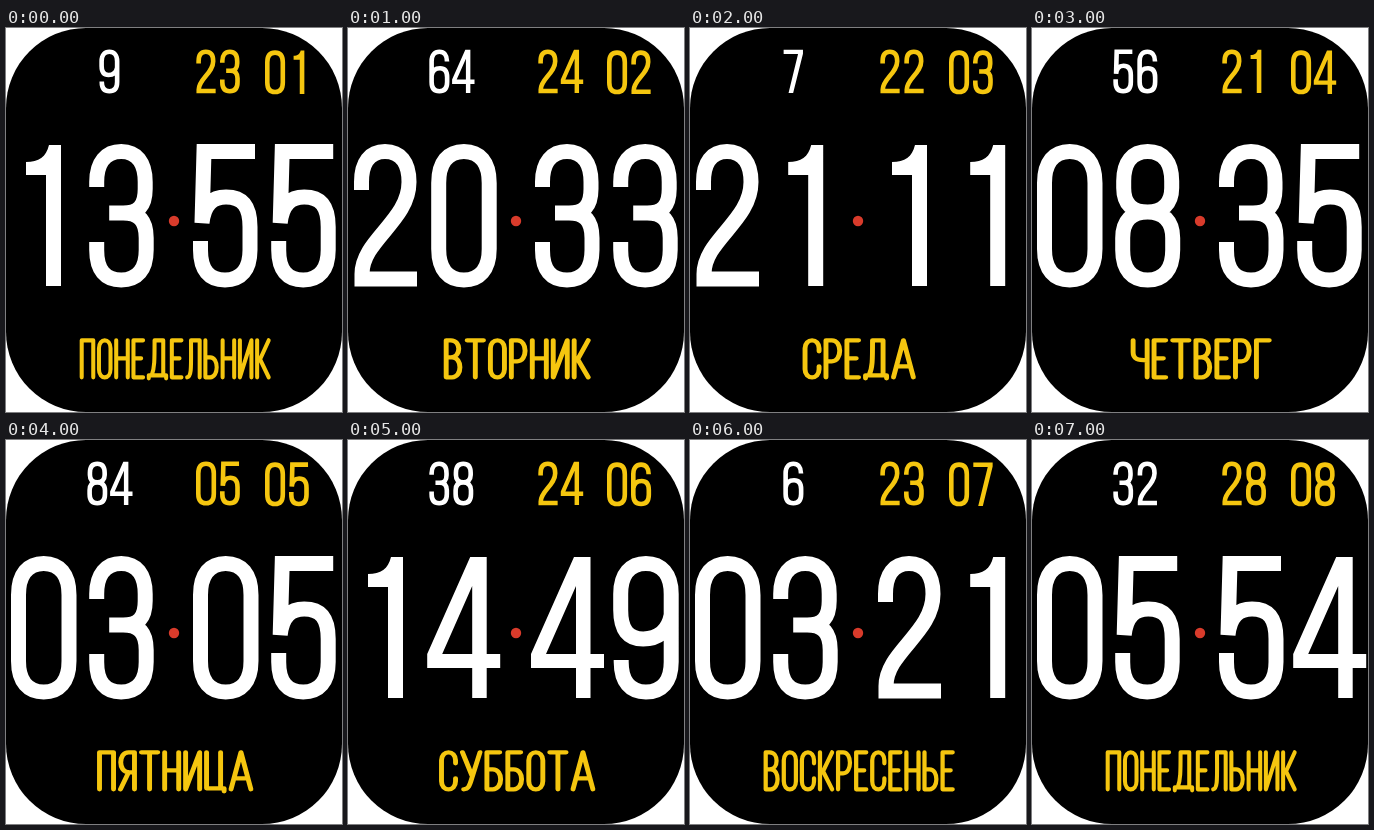
Animation, 336 px wide and 384 px high, one loop 8 s. Source, as an HTML page:

```html
<!DOCTYPE html>
<html lang="ru">
<head>
<meta charset="utf-8">
<title>Циферблат</title>
<style>
  html, body { margin: 0; width: 100%; height: 100%; overflow: hidden; background: #fff; }
  svg { display: block; width: 336px; height: 384px; }
  .line { fill: none; stroke: currentColor; stroke-width: 15; }
  .solid { fill: currentColor; fill-rule: evenodd; }
  .letter { fill: none; stroke: #f5c60f; stroke-width: 4.2; stroke-linecap: round; stroke-linejoin: round; }
</style>
</head>
<body>
<svg viewBox="0 0 336 384">
  <rect width="336" height="384" rx="80"/>
  <circle cx="168" cy="193" r="5.2" fill="#d83b2b"/>
  <g id="face"></g>
</svg>
<script>
// Digits live in a cell 65 wide and 143.5 high
const LINES = {
  0: 'M7.5 39C7.5 18 17 7.5 32.7 7.5S58 18 58 39V105C58 126 48 136 32.7 136S7.5 126 7.5 105Z',
  2: 'M8.5 46V38C8.5 18 17 7.5 32 7.5S56 18 56 38C56 77 9 96 9 130V135H64',
  3: 'M7.5 43V38C7.5 18 17 7.5 32 7.5S56 18 56 38V45C56 62 49 69 34 69H20M34 69C49 69 57 76 57 94V106C57 126 48 136 32 136S7.5 126 7.5 106V98',
  5: 'M62 7.5H11L9 79C11 60 20 53 33 53C50 53 57 63 57 83V106C57 126 48 136 32 136S7.5 126 7.5 106V97',
  6: 'M57.5 39V38C57.5 18 48 7.5 32.7 7.5S7.5 18 7.5 38V106C7.5 126 17 136 32.7 136S58 126 58 106V90C58 70 50 61 35 61C20 61 10 69 7.5 85',
  8: 'M32.5 68C17 68 8.5 60 8.5 44V37C8.5 18 17 7.5 32.5 7.5S56.5 18 56.5 37V44C56.5 60 47 68 32.5 68C16 68 7.5 77 7.5 94V106C7.5 126 17 136 32.5 136S57.5 126 57.5 106V94C57.5 77 48 68 32.5 68Z',
  9: 'M8 104V106C8 126 17 136 32.7 136S58 126 58 106V38C58 18 48 7.5 32.7 7.5S7.5 18 7.5 38V54C7.5 74 15 83 30 83C45 83 55 75 58 59'
};
const SOLIDS = {
  1: 'M15 31V18C28 18 35 13 38 1H50V142H35V31Z',
  4: 'M-4 98L39 1H55.5V98H69V112H55.5V142H41V112H-4ZM11 98H41V30Z',
  7: 'M1 1H64V14L32 142H17L48 15H1Z'
};
// Letters are centre lines 37 high, 12 wide unless listed in WIDTHS
const LETTERS = {
  А: 'M0 37L8.5 0L17 37M3 26H14',
  Б: 'M11 0H0V37H5C14 37 14 17 5 17H0',
  В: 'M0 17V0H4C13 0 13 17 4 17H0V37H5C14 37 14 17 5 17',
  Г: 'M0 37V0H11',
  Д: 'M0 38V35H18V38M3 35C6 28 6 20 6 0H15V35',
  Е: 'M10 0H0V37H10M0 18H8',
  И: 'M0 0V37L12 0V37',
  К: 'M0 0V37M12 0L3 19L12 37M0 21L3 19',
  Л: 'M0 37C5 36 4 25 4 0H13V37',
  Н: 'M0 0V37M12 0V37M0 18H12',
  О: 'M0 8C0 -2.7 12 -2.7 12 8V29C12 39.7 0 39.7 0 29Z',
  П: 'M0 37V0H12V37',
  Р: 'M0 37V0H5C14 0 14 21 5 21H0',
  С: 'M12 11V8C12 -2.7 0 -2.7 0 8V29C0 39.7 12 39.7 12 29V26',
  Т: 'M0 0H14M7 0V37',
  У: 'M0 0L8 23M15 0L8 26C6 34 5 37 1 37',
  Ц: 'M0 0V36H15V39M12 0V36',
  Ч: 'M0 0V12C0 19 4 20 12 20M12 0V37',
  Ь: 'M0 0V37H5C14 37 14 17 5 17H0',
  Я: 'M12 37V0H7C-2 0 -2 20 7 20H12M7 20L0 37'
};
const WIDTHS = { А: 17, Г: 11, Д: 18, Е: 10, Л: 13, Т: 14, У: 15, Ц: 15 };
const GAP = 5.9, LETTER_SCALE = 1.17, MAX_WORD = 187;
const PITCH = 78.2, SMALL = 0.307;

// battery, day, month, hours, minutes, weekday
const SCREENS = [
  ['9', '23', '01', '13', '55', 'ПОНЕДЕЛЬНИК'],
  ['64', '24', '02', '20', '33', 'ВТОРНИК'],
  ['7', '22', '03', '21', '11', 'СРЕДА'],
  ['56', '21', '04', '08', '35', 'ЧЕТВЕРГ'],
  ['84', '05', '05', '03', '05', 'ПЯТНИЦА'],
  ['38', '24', '06', '14', '49', 'СУББОТА'],
  ['6', '23', '07', '03', '21', 'ВОСКРЕСЕНЬЕ'],
  ['32', '28', '08', '05', '54', 'ПОНЕДЕЛЬНИК']
];

function number(digits, x, y, color, scale = 1) {
  const cells = [...digits].map((d, i) =>
    `<path transform="translate(${i * PITCH})" class="${LINES[d] ? 'line' : 'solid'}" d="${LINES[d] || SOLIDS[d]}"/>`);
  return `<g color="${color}" transform="translate(${x} ${y}) scale(${scale})">${cells.join('')}</g>`;
}

function weekday(word) {
  let x = 0, paths = '';
  for (const c of word) {
    paths += `<path class="letter" transform="translate(${x})" d="${LETTERS[c]}"/>`;
    x += (WIDTHS[c] || 12) + GAP;
  }
  const width = x - GAP, scale = Math.min(LETTER_SCALE, MAX_WORD / width);
  return `<g role="img" aria-label="${word}" transform="translate(${169.2 - width * scale / 2} 312.3) scale(${scale} 1)">${paths}</g>`;
}

const face = document.getElementById('face');
let shown = -1;

function draw() {
  const index = Math.floor(performance.now() / 1000) % SCREENS.length;
  if (index !== shown) {
    shown = index;
    const [battery, day, month, hours, minutes, name] = SCREENS[index];
    const batteryWidth = ((battery.length - 1) * PITCH + 65) * SMALL;
    face.innerHTML =
      number(battery, 103.3 - batteryWidth / 2, 21.5, '#fff', SMALL) +
      number(day, 190, 21.5, '#f5c60f', SMALL) +
      number(month, 259, 22.3, '#f5c60f', SMALL) +
      number(hours, 5, 116, '#fff') +
      number(minutes, 187, 116, '#fff') +
      weekday(name);
  }
  requestAnimationFrame(draw);
}
draw();
</script>
</body>
</html>
```
